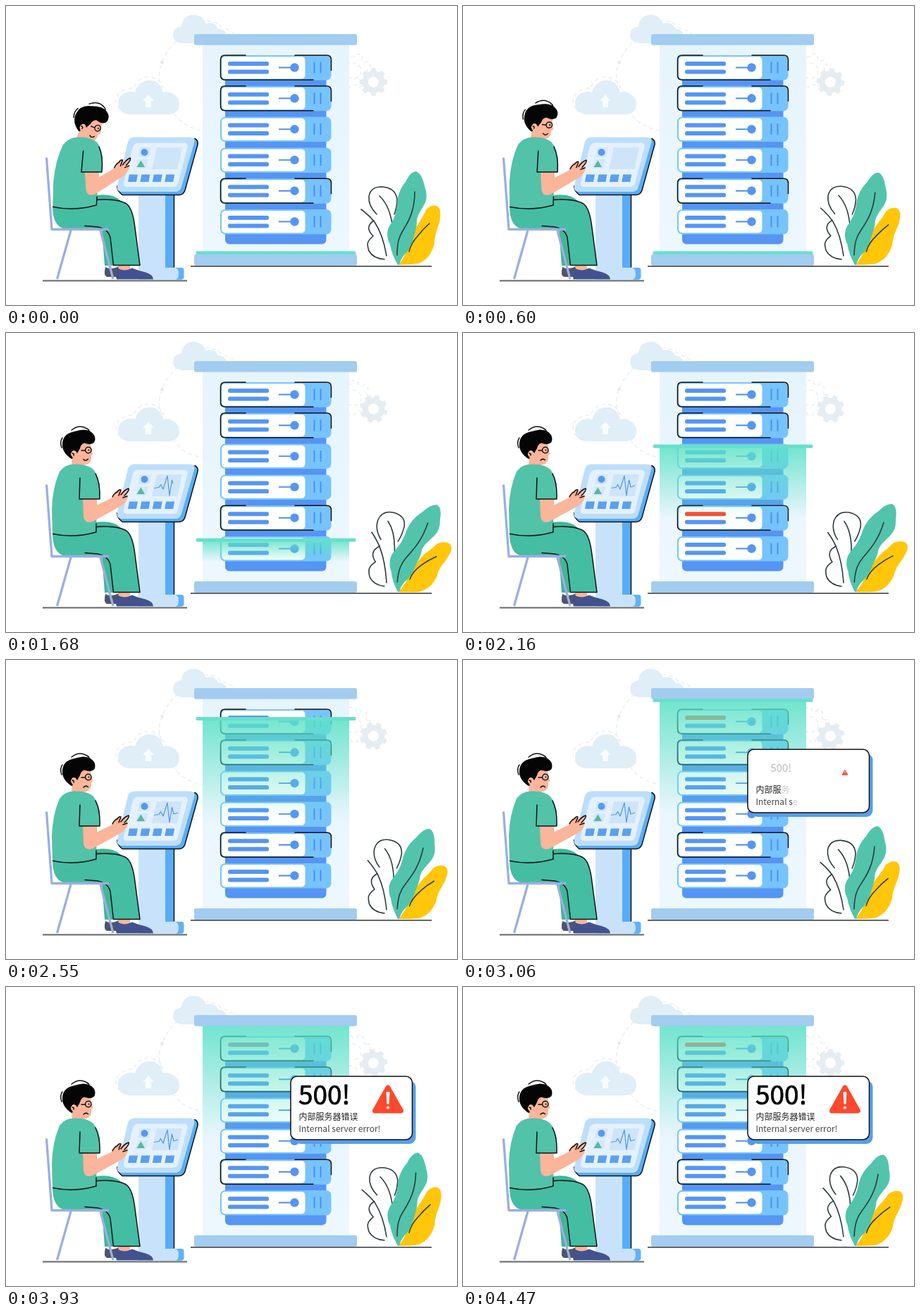
Write an HTML page that moves like this. It is 640 px wide and 425 px high and loops after 4500 ms.

```html
<!DOCTYPE html>
<html lang="zh">
<head>
<meta charset="utf-8">
<style>
html, body { margin: 0; width: 100%; height: 100%; overflow: hidden; background: #fff; }
svg { display: block; width: 100vw; height: 100vh; }
text { font-family: "Noto Sans CJK SC", "Noto Sans CJK", "Noto Sans", sans-serif; }
.ink { fill: none; stroke: #111; stroke-width: 1.5; stroke-linecap: round; stroke-linejoin: round; }
.dash { fill: none; stroke: #e4eaee; stroke-width: 1.1; stroke-dasharray: 6 4; }
.vein { fill: none; stroke: #2f3a3c; stroke-width: 1.6; stroke-linecap: round; stroke-linejoin: round; }
</style>
</head>
<body>
<svg viewBox="0 0 640 425">
  <defs>
    <linearGradient id="cab" x1="0" y1="0" x2="0" y2="1">
      <stop offset="0" stop-color="#e6f4fc"/><stop offset="1" stop-color="#edf7fe"/>
    </linearGradient>
    <linearGradient id="glow" x1="0" y1="0" x2="0" y2="1">
      <stop offset="0" stop-color="#5ce2c6" stop-opacity=".85"/>
      <stop offset="1" stop-color="#5ce2c6" stop-opacity="0"/>
    </linearGradient>
  </defs>

  <!-- clouds and gears -->
  <g fill="#dfeef7">
    <path d="M250 53 Q237 51 237 41 Q238 30 249 29 C250 17 258 12.500 267 12.500 Q279 13 284 25 Q296 21 301 32 Q313 33 313 43 L313 53 Z"/>
    <path d="M174 154 Q159 152 159 138 Q160 125 174 122 Q180 121 183 123 Q188 106 204 105.500 Q219 106 223 123 Q230 120 237 125 Q247 130 246 142 Q244 153 232 154 Z"/>
  </g>
  <path d="M202 126 L210 135 H206 V144 H198 V135 H194 Z" fill="#fff" opacity=".8"/>
  <path class="dash" d="M171 150 Q156 148 156 134 Q158 121 172 118 Q180 116 181 117 Q187 101 203 101 Q218 102 224 117"/>
  <g id="flow" class="dash">
    <path d="M242 50 Q224 66 218 92 Q216 108 222 116"/>
    <path d="M238 153 Q254 174 280 177"/>
    <path d="M284 21 Q300 22 306 31 Q318 33 324 40"/>
  </g>
  <circle cx="221.500" cy="80" r="2.200" fill="#e1e8ec"/>
  <g transform="translate(493 92)"><path id="gearB" class="dash"/><circle class="dash" r="11"/></g>
  <g transform="translate(521.500 108)"><path id="gearA" fill="#e5edf3"/><circle r="7.500" fill="#fff"/></g>

  <!-- cabinet -->
  <rect x="279" y="54" width="208" height="300" fill="url(#cab)"/>
  <rect x="311" y="80" width="143.500" height="258.500" rx="6" fill="#5595f3"/>
  <g id="racks"></g>
  <rect id="trail" x="279" width="208" fill="url(#glow)"/>
  <rect id="scan" x="269.500" width="227" height="5" rx="2" fill="#66e0cb"/>
  <g fill="#a2ccf0">
    <rect x="267" y="40" width="231" height="15.500" rx="2.500"/>
    <rect x="267" y="353" width="231" height="16" rx="2.500"/>
  </g>
  <path d="M262 370H604M52 390.500H257" stroke="#636669" stroke-width="1.800"/>

  <!-- plant -->
  <path id="bud" class="vein"/>
  <path id="loop" class="vein"/>
  <path id="gold" fill="#ffc60a"/>
  <path id="goldV" class="vein"/>
  <path id="leaf" fill="#52c4ab"/>
  <path id="leafV" class="vein"/>

  <!-- kiosk -->
  <rect x="188" y="262" width="40" height="127" fill="#c9e2fb"/>
  <path d="M226 262H239V373H226Z" fill="#58adf6"/>
  <path d="M238.500 268V371" class="ink"/>
  <path d="M200 372H249Q252.500 372 252.500 376V385Q252.500 389 248 389H200Z" fill="#5fb2f7"/>
  <path d="M188 372H240Q245 373 245 381Q245 388 240 389H188Z" fill="#c9e2fb"/>
  <path d="M180 189L266 188Q274 189 272 197L254 262Q252 269 246 269H165L158 262Z" fill="#58adf6"/>
  <path d="M157.500 256Q158 263 165 268.500H246Q252 268 254 262L272 197Q273 191 268 188.500" class="ink"/>
  <path d="M182 186.500H261Q269 187 267 195L249 257Q247 264 241 264H164Q156 263 158 255L173 193Q175 187 182 186.500Z" fill="#bcdefc"/>
  <path d="M187 194.500H253Q259 195 257.500 201L244 252Q243 257 237 257H171Q166 256 167 251L180 200Q182 195 187 194.500Z" fill="#e4f1fd"/>
  <path d="M190 201H206L203 215H187ZM187 218H202L199 231H184Z" fill="#d3e8fa"/>
  <path d="M214 201H250L243.500 232H207Z" fill="#cee5f9"/>
  <circle cx="196.500" cy="208" r="5" fill="#5599ee"/>
  <path d="M191.500 219.500L197 229H185.500Z" fill="#56b89c"/>
  <path id="keys" fill="#5a9ff0"/>
  <path id="pulse" d="M210 220.500L217 219.500L219.500 215.500L223 222L229 203L232 231L235.500 209L238 219L244 217" fill="none" stroke="#4e96e8" stroke-width="1.200" stroke-linejoin="round" pathLength="100" stroke-dasharray="100 200"/>

  <!-- man -->
  <path d="M141 371Q150 376 160 370V385H143Q138 383 141 371Z" fill="#4d5470"/>
  <path d="M159 366H176V379H160Z" fill="#fbb59a"/>
  <path d="M159 373Q168 378 179 372.500Q187 376 198 378.500Q209 382 209 388.500H157Q154 381 159 373Z" fill="#42528f"/>
  <path d="M128 269Q152 266 163 277L148 322L153 369H140L136 316H100Z" fill="#3fb799"/>
  <path d="M66 284L128 276Q160 274 172 282Q180 289 183 315L190 368.500H153L148 331Q146 319 134 316.500H82Q66 312 66 284Z" fill="#44bda3"/>
  <path class="ink" d="M128 275.500Q160 273.500 172 282Q180 289 183 315L190 368.500H152.500L148 329Q145 317 130 314L112 312.500"/>
  <g id="upper">
    <g id="head">
      <path d="M94 172L93 189Q103 194 112 187L110 176Z" fill="#fbb59a"/>
      <path d="M95 158Q108 148 120 154L121 165L123.500 172L121 174Q122 185 114 187Q101 188 96 178Z" fill="#fbb59a"/>
      <path d="M93 179Q79 170 80 157Q81 143 97 140Q112 135 120 140Q129 146 125.500 155Q121 160 111 156.500Q106 158 105 164L101 171Q98 165 94 168Q91 172 95 178Z" fill="#050505"/>
      <path class="ink" d="M93 138Q104 129 115 136Q119 138 118 142M79 163Q76 154 80 149M112 167H107"/>
      <circle cx="95.500" cy="172" r="3.500" fill="#fbb59a"/>
      <path class="ink" d="M94 171Q97 171 96 174"/>
      <circle class="ink" cx="116.800" cy="166.500" r="4.200"/>
      <circle cx="117.500" cy="166.500" r="1.100" fill="#111"/>
      <path id="mouth" class="ink"/>
    </g>
    <path d="M99 186.500Q84 185.500 76 197Q66 220 65 250L66 286Q96 292 128 283L129 236Q133 233 133 222Q133 205 124 194Q115 186 99 186.500Z" fill="#52c2a8"/>
    <path class="ink" d="M66.500 285.500Q96 292 128 283V271"/>
    <g id="arm">
      <path d="M109 234L110 261Q112 272 123 268L163 246Q172 240 173 232L169 227L174.500 223Q173 219 165 225L159 223Q152 226 151 234L128 245L130 234Z" fill="#fbb59a"/>
      <path class="ink" d="M151 233Q154 227 158 226Q160 222 163 223L160 231M163 230Q168 223 174 221Q176 223 168 231M166 234L172 232"/>
    </g>
    <path d="M106 202L104 236H133V214L122 196Z" fill="#52c2a8"/>
    <path class="ink" d="M105 206L104 236H133Q134 214 127 200"/>
  </g>
  <path d="M57.500 215.500L65 317.500H146M92 319L72.500 388M134 319L152 388" fill="none" stroke="#9caee0" stroke-width="3.300" stroke-linejoin="round"/>

  <!-- alert -->
  <g id="alert">
    <rect x="409" y="133" width="172.500" height="90" rx="9" fill="#579fe9"/>
    <rect x="404" y="127" width="172.500" height="90" rx="9" fill="#fff" stroke="#111" stroke-width="1.500"/>
    <g id="code"><text x="415" y="167" font-size="37" font-weight="500" stroke="#000" stroke-width=".7">500!</text></g>
    <g id="warn">
      <path d="M542 143L560.500 176H523.500Z" fill="#fc492d" stroke="#fc492d" stroke-width="7" stroke-linejoin="round"/>
      <path d="M540 149.500H544L543 166H541Z" fill="#fff" stroke="#fff" stroke-linejoin="round"/>
      <circle cx="542" cy="171.500" r="2.100" fill="#fff"/>
    </g>
    <text id="zh" x="415.500" y="189" font-size="12" fill="#222"></text>
    <text id="en" x="415.500" y="206" font-size="12" fill="#444"></text>
  </g>
</svg>
<script>
const LOOP = 4500, STEP = 30;
const $ = id => document.getElementById(id);
const set = (id, attrs) => { for (const k in attrs) $(id).setAttribute(k, attrs[k]); };
const clamp = v => Math.max(0, Math.min(1, v));
const span = (t, from, len) => clamp((t - from) / len);
const smooth = p => p * p * (3 - 2 * p);
const easeOut = p => 1 - (1 - p) * (1 - p);
const mix = (a, b, p) => a + (b - a) * p;
const scaleAt = (x, y, s) => `translate(${x} ${y}) scale(${s}) translate(${-x} ${-y})`;

function rack(i) {
  const y = 70.5 + 43.8 * i;
  const edge = [0, 1, 4].includes(i)
    ? `<path class="ink" d="M340 ${y - .5}H311Q304.500 ${y - .5} 304.500 ${y + 6}V${y + 28}Q304.500 ${y + 34.5} 311 ${y + 34.5}H436M410 ${y - .5}H455Q461.500 ${y - .5} 461.500 ${y + 6}V${y + 21}"/>` : '';
  return `<rect x="304" y="${y - .5}" width="157.500" height="35.500" rx="7" fill="#77c3fd"/>
    <rect x="306" y="${y + 1.5}" width="118.500" height="31.500" rx="5" fill="#fff"/>
    <rect id="lamp${i}" x="315" y="${y + 8.5}" width="58" height="6" rx="2.500" fill="#5595f3"/>
    <rect x="315" y="${y + 20}" width="58" height="6" rx="2.500" fill="#5595f3"/>
    <path d="M387 ${y + 17}H409M437.500 ${y + 9}V${y + 25}M446.500 ${y + 9}V${y + 25}" stroke="#4a8df0" stroke-width="1.900"/>
    <circle cx="409.500" cy="${y + 17}" r="6.200" fill="#5595f3"/>${edge}`;
}
$('racks').innerHTML = [0, 1, 2, 3, 4, 5].map(rack).join('');

set('keys', { d: [0, 1, 2, 3].map(i => `M${175 + 17.4 * i} 239.500h12l-2 10.500h-12z`).join('') });

function gear(r, teeth) {
  const pts = [];
  for (let i = 0; i < teeth; i++)
    for (const [o, k] of [[-.32, .8], [-.2, 1], [.2, 1], [.32, .8]]) {
      const a = (i + o) * 2 * Math.PI / teeth;
      pts.push((r * k * Math.cos(a)).toFixed(2) + ' ' + (r * k * Math.sin(a)).toFixed(2));
    }
  return 'M' + pts.join('L') + 'Z';
}
set('gearA', { d: gear(20, 8) });
set('gearB', { d: gear(25, 8) });

// Bends a path: points farther from the root turn more.
function bend(d, x0, y0, reach, deg) {
  return d.replace(/(-?[\d.]+) (-?[\d.]+)/g, (m, x, y) => {
    const dx = x - x0, dy = y - y0;
    const a = deg * Math.PI / 180 * Math.min(1.1, Math.hypot(dx, dy) / reach);
    const c = Math.cos(a), s = Math.sin(a);
    return (x0 + dx * c - dy * s).toFixed(2) + ' ' + (y0 + dx * s + dy * c).toFixed(2);
  });
}
const plant = [
  ['bud', 'M504 289 Q516 298 523 307 Q535 325 540 355 M522 305 C511 312 514 320 521 327 C510 336 513 341 515 348 Q521 359 537 360', 540, 360, 78, 11.5],
  ['loop', 'M526 296 Q514 284 515 271 Q517 257 533 257 Q553 258 555 275 Q555 286 551 296 M530 270 Q546 285 549 318', 553, 352, 97, 9.5],
  ['gold', 'M557 368 C571 352 572 332 583 313 C588 304 592 300 596 290 Q603 282 611 284 Q618 288 616 301 C615 313 608 322 608 338 Q602 360 585 366 Q571 368 557 368 Z', 557, 368, 97, 13.5],
  ['goldV', 'M572 349 Q574 338 585 326 Q592 317 601 309', 557, 368, 97, 13.5],
  ['leaf', 'M556 368 Q547 352 545 339 C540 330 540 320 544 313 C550 303 554 297 555 280 C556 266 562 256 567 250 Q574 235 582 235 Q590 238 594 256 Q599 270 595 279 C590 290 585 294 583 304 C583 315 581 320 579 327 Q574 346 565 354 Q560 360 558 368 Z', 557, 368, 135, 13.5],
  ['leafV', 'M555 354 C555 336 558 327 564 318 C572 305 580 290 580 264', 557, 368, 135, 13.5]
];

const letters = (id, str) => {
  $(id).innerHTML = [...str].map(c => `<tspan>${c}</tspan>`).join('');
};
letters('zh', '内部服务器错误');
letters('en', 'Internal server error!');
function type(id, p) {
  const cells = $(id).children;
  for (let i = 0; i < cells.length; i++)
    cells[i].setAttribute('fill-opacity', clamp(p * cells.length - i));
}

function lamp(i, p) {
  const c = [[85, 251], [149, 73], [243, 45]].map(([a, b]) => Math.round(mix(a, b, p)));
  set('lamp' + i, { fill: `rgb(${c})` });
}

function draw(t) {
  // plant and background
  const sway = (1 - Math.cos(2 * Math.PI * t / 3600)) / 2;
  for (const [id, d, x, y, reach, deg] of plant) set(id, { d: bend(d, x, y, reach, deg * sway) });
  set('flow', { 'stroke-dashoffset': -t / 45 });
  set('gearA', { transform: `rotate(${t / LOOP * 45})` });
  set('gearB', { transform: `rotate(${-t / LOOP * 45 + 22})` });

  // man
  const k = 1 - smooth(span(t, 0, 1050));
  const lean = .055 * k;
  set('upper', { transform: `matrix(1 0 ${-lean} 1 ${lean * 290} 0)` });
  set('head', { transform: `translate(${2 * k} ${k}) rotate(${18 * k} 100 185)` });
  set('arm', { transform: `translate(${2 * k} 0) rotate(${-5 * k} 115 262)` });
  const frown = smooth(span(t, 1890, 180));
  set('mouth', { d: `M110 ${mix(179.5, 181, frown)}Q113 ${mix(183, 177.5, frown)} 116.500 ${mix(179, 180.5, frown)}` });
  set('pulse', {
    'stroke-dashoffset': 100 * (1 - easeOut(span(t, 900, 1150))),
    visibility: t > 900 ? 'visible' : 'hidden'
  });

  // scan
  const wave = 1 / (1 + Math.exp(-(t - 2018) * .0041));
  const y = 351 - 298 * clamp((wave - .012) / .988);
  set('scan', { y: y - 2.5 });
  set('trail', { y, height: Math.max(0, (351 - y) * .54) });
  const blink = (from, peak) => t < from ? 0 : (1 + Math.cos(2 * Math.PI * (t - peak) / 700)) / 2;
  lamp(4, t < 2510 ? blink(1810, 2160) : 0);
  lamp(0, blink(2710, 3060));

  // alert
  const pop = easeOut(span(t, 2700, 240));
  const a = span(t, 2970, 400), b = span(t, 3020, 400), text = span(t, 2850, 450);
  set('alert', { transform: scaleAt(492, 175, pop), opacity: pop });
  set('code', { transform: scaleAt(451, 153, easeOut(a)), opacity: a });
  set('warn', { transform: scaleAt(542, 160, easeOut(b)) });
  type('zh', text);
  type('en', text);
}

const start = performance.now();
function tick() {
  const t = (performance.now() - start) % LOOP;
  draw(Math.floor(t / STEP) * STEP);
  requestAnimationFrame(tick);
}
tick();
</script>
</body>
</html>
```
